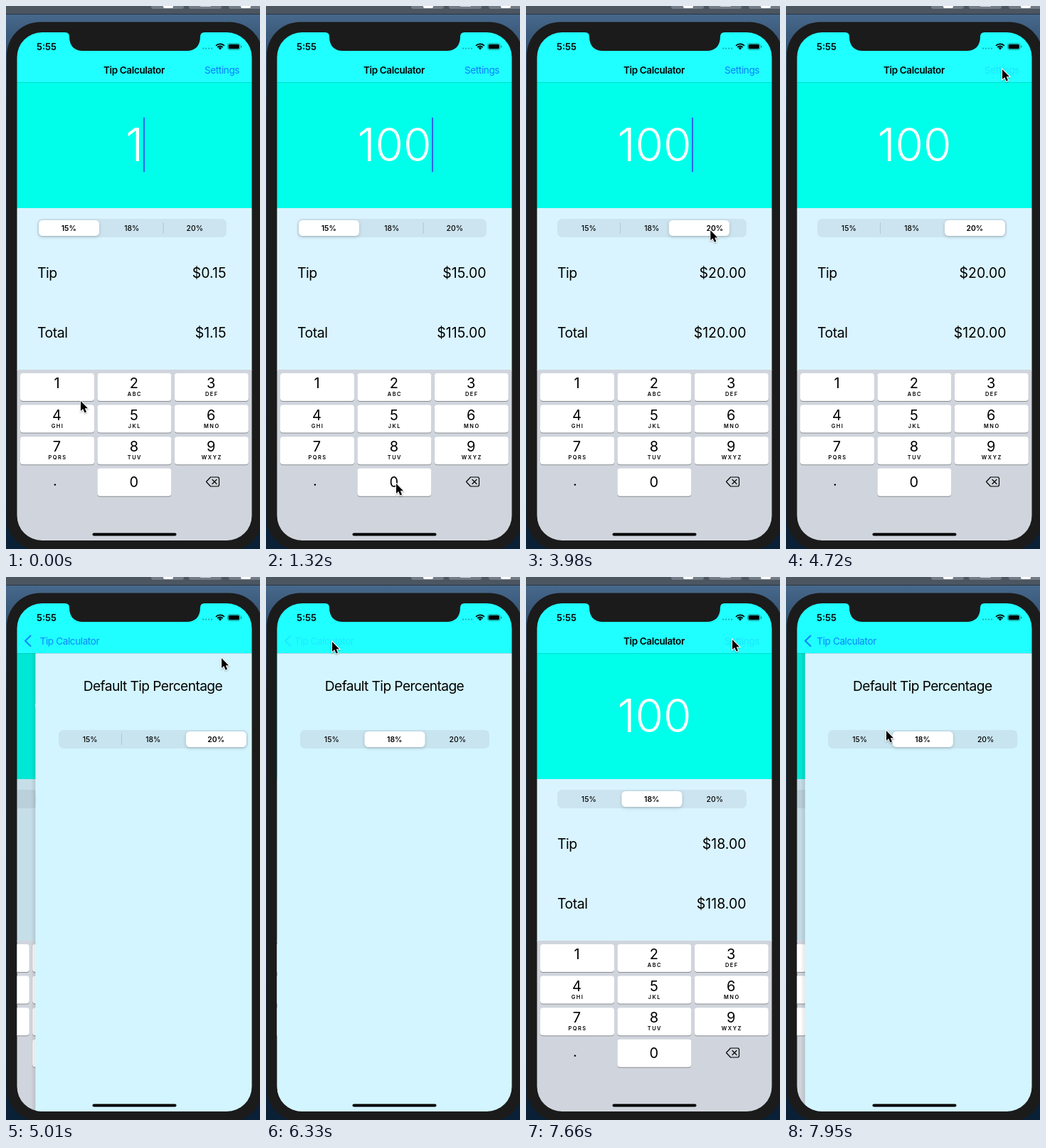
An HTML page with a canvas that plays this animation: 357 px wide and 763 px high, repeating every 8 s.

```html
<!DOCTYPE html>
<html lang="en">
<head>
<meta charset="utf-8">
<title>Tip Calculator</title>
<style>
  html, body { margin: 0; height: 100%; overflow: hidden; background: #1b1b1b; }
  canvas { display: block; }
</style>
</head>
<body>
<canvas id="stage" width="357" height="763"></canvas>
<script>
const ctx = document.getElementById('stage').getContext('2d');
const LOOP = 8000, TICK = 147.2;
const SCREEN = { x: 15.5, y: 37, w: 330, h: 714 };
const BLUE = '#0a7dff', FRAME = '#1b1b1b';
const RATES = [15, 18, 20];

// Pointer stops: tick, x, y
const POINTER = [
  [0, 105, 555], [1, 142, 630], [2, 180, 690], [3, 183, 671], [9, 183, 671],
  [11, 184, 540], [13, 183, 340], [14, 183, 313], [22, 183, 313], [24, 225, 316],
  [25, 262, 316], [28, 258, 315], [30, 296, 130], [31, 306, 82], [32, 304, 89],
  [33, 304, 93], [34, 303, 114], [36, 215, 205], [37, 181, 228], [39, 181, 228],
  [41, 104, 66], [42, 94, 84], [43, 93, 91], [46, 94, 91], [50, 297, 75],
  [52, 290, 88], [54, 141, 216]
];

function box(x, y, w, h, r, fill) {
  ctx.beginPath();
  ctx.roundRect(x, y, w, h, r);
  ctx.fillStyle = fill;
  ctx.fill();
}

function text(str, x, y, size, { weight = 400, color = '#000', align = 'left', gap = 0, alpha = 1 } = {}) {
  ctx.save();
  ctx.globalAlpha *= alpha;
  ctx.font = `${weight} ${size}px Inter, sans-serif`;
  ctx.letterSpacing = gap + 'px';
  ctx.textAlign = align;
  ctx.fillStyle = color;
  ctx.fillText(str, x, y);
  ctx.restore();
}

function line(points, color, width, close = false) {
  ctx.beginPath();
  points.forEach(([x, y]) => ctx.lineTo(x, y));
  if (close) ctx.closePath();
  ctx.strokeStyle = color;
  ctx.lineWidth = width;
  ctx.lineJoin = ctx.lineCap = 'round';
  ctx.stroke();
}

// Thumb position of a segmented control: three quarters of the way on the first tick of a change
const thumbAt = (tick, start, changes) => changes.reduce(
  (pos, [at, to]) => tick < at ? pos : tick === at ? pos + (to - pos) * 0.75 : to, start);

const spring = dt => dt < 0 ? 1 : (1 + 18 * dt) * Math.exp(-18 * dt);

// 0 = calculator, 1 = settings
function pageProgress(s) {
  if (s < 6.4) return 1 - spring(s - 4.772);
  return s < 7.66 ? spring(s - 6.4) : 1 - spring(s - 7.66);
}

function pointerAt(tick) {
  const next = POINTER.findIndex(stop => stop[0] >= tick);
  const [t1, x1, y1] = POINTER[next], [t0, x0, y0] = POINTER[Math.max(0, next - 1)];
  const k = t1 === t0 ? 1 : (tick - t0) / (t1 - t0);
  return [x0 + (x1 - x0) * k, y0 + (y1 - y0) * k];
}

function drawDesktop() {
  const g = ctx.createLinearGradient(0, 11, 0, 763);
  [[0, '#47698c'], [0.07, '#33506e'], [0.2, '#1c2e45'], [1, '#0a2036']].forEach(s => g.addColorStop(...s));
  ctx.fillStyle = g;
  ctx.fillRect(0, 0, 357, 763);
  box(0, 0, 357, 11, 0, '#4b5661');
  box(0, 11, 357, 1, 0, '#2b3641');
  for (const x of [204, 257, 313]) box(x, -6, 46, 10, 3, '#737c86');
  box(221, -3, 14, 6, 2, '#fff');
  box(273, -3, 15, 4, 1, '#ccd1d6');
  box(330, -3, 14, 6, 2, '#fff');
  box(1, 22.5, 360, 743, 47, FRAME);
}

function drawSegments(x, y, thumb) {
  const chosen = Math.round(thumb);
  box(x, y, 266, 26, 7, 'rgba(118,118,128,.13)');
  [1, 2].forEach(n => {
    if (chosen !== n && chosen !== n - 1) box(x + n * 88.5 - 0.3, y + 5, 0.8, 16, 0, 'rgba(60,60,67,.22)');
  });
  ctx.save();
  ctx.shadowColor = 'rgba(0,0,0,.2)';
  ctx.shadowBlur = 4;
  ctx.shadowOffsetY = 1.5;
  box(x + 2 + thumb * 88.5, y + 2, 85, 22, 5.5, '#fff');
  ctx.restore();
  RATES.forEach((rate, n) => text(rate + '%', x + 44.3 + n * 88.5, y + 17, 10.4,
    { weight: n === chosen ? 600 : 500, align: 'center' }));
}

function drawKeyboard() {
  box(15, 511, 331, 241, 0, '#d0d5dd');
  const letters = ['', 'ABC', 'DEF', 'GHI', 'JKL', 'MNO', 'PQRS', 'TUV', 'WXYZ'];
  const key = (col, row, digit, sub) => {
    const x = 20 + col * 108.4, y = 516 + row * 44.6;
    box(x, y + 1, 104, 39, 4, '#898b90');
    box(x, y, 104, 39, 4, '#fff');
    text(digit, x + 51.5, y + (sub === undefined ? 26.5 : 21), 20, { align: 'center' });
    if (sub) text(sub, x + 52.5, y + 32, 7.4, { weight: 600, align: 'center', gap: 1.5 });
  };
  letters.forEach((sub, n) => key(n % 3, Math.floor(n / 3), n + 1, sub));
  key(1, 3, 0);
  text('.', 69, 674, 20, { align: 'center' });
  line([[281.5, 668.5], [287.5, 662], [298, 662], [299.5, 663.5], [299.5, 673.5], [298, 675], [287.5, 675]], '#000', 1.2, true);
  line([[290, 665.5], [296, 671.5]], '#000', 1.2);
  line([[296, 665.5], [290, 671.5]], '#000', 1.2);
}

function drawCalculator(tick, p) {
  const bill = tick < 3 ? 1 : tick < 5 ? 10 : 100;
  const thumb = thumbAt(tick, 0, [[21, 1], [27, 2], [44, 1]]);
  const tip = bill * RATES[Math.round(thumb)] / 100;
  ctx.save();
  ctx.translate(-p * 99, 0);
  box(15, 107, 331, 177, 0, '#00ffea');
  box(15, 284, 331, 228, 0, '#d9f4ff');
  text(bill, 180.5, 218, 64, { weight: 300, color: '#fff', align: 'center' });
  const phase = tick < 9 ? 6 : (tick - 9) % 7;
  const caret = [0.35, 0, 0, 0.6, 1, 1, 1][phase];
  if (p < 0.01) box(173 + 20 * String(bill).length, 156.5, 2, 77, 1, `rgba(45,105,235,${caret})`);
  drawSegments(44, 299, thumb);
  [['Tip', tip, 382], ['Total', bill + tip, 466]].forEach(([label, amount, y]) => {
    text(label, 44, y, 19.5, { gap: -0.5 });
    text('$' + amount.toFixed(2), 309.5, y, 19.5, { align: 'right' });
  });
  box(15, 107, 331, 404, 0, `rgba(0,0,0,${0.1 * p})`);
  drawKeyboard();
  ctx.restore();
}

function drawSettings(tick, p) {
  ctx.save();
  ctx.translate((1 - p) * SCREEN.w, 0);
  const shade = ctx.createLinearGradient(9, 0, 15.5, 0);
  shade.addColorStop(0, 'rgba(0,0,0,0)');
  shade.addColorStop(1, 'rgba(0,0,0,.1)');
  box(9, 107, 6.5, 645, 0, shade);
  box(15.5, 107, 331, 645, 0, '#d3f5ff');
  text('Default Tip Percentage', 180.5, 160, 19.2, { align: 'center', gap: -0.6 });
  drawSegments(48, 215, thumbAt(tick, 2, [[38, 1]]));
  ctx.restore();
}

function drawBars(tick, p) {
  box(15, 37, 331, 70, 0, '#20ffff');
  box(15, 107, 331, 0.6, 0, 'rgba(0,0,0,.25)');
  const x = 40 + 97 * (1 - p), gap = -0.37;
  const back = p * (tick === 43 ? 0.17 : 1);
  text('Tip Calculator', x, 94.5, 13.5, { weight: 600, gap, alpha: Math.max(0, 1 - p * 1.5) });
  text('Tip Calculator', x, 94.5, 13.5, { color: BLUE, gap, alpha: back });
  ctx.globalAlpha = back;
  line([[34.5, 82.5], [27, 89.7], [34.5, 97]], BLUE, 2);
  ctx.globalAlpha = 1;
  const pressed = tick === 32 || tick === 52;
  text('Settings', 279, 94.5, 13.5, { color: BLUE, gap, alpha: pressed ? 0.2 : Math.max(0, 1 - p * 1.5) });

  text('5:55', 43, 61.5, 13, { weight: 600 });
  for (let n = 0; n < 4; n++) box(276 + n * 4, 58.5, 2.2, 2.2, 1, 'rgba(0,70,80,.4)');
  ctx.strokeStyle = '#000';
  ctx.lineCap = 'butt';
  [[1.6, 3.2], [5, 1.9], [8.1, 1.9]].forEach(([r, width]) => {
    ctx.beginPath();
    ctx.arc(301, 61.5, r, -Math.PI * 0.76, -Math.PI * 0.24);
    ctx.lineWidth = width;
    ctx.stroke();
  });
  ctx.beginPath();
  ctx.roundRect(311.5, 52.5, 17.5, 9, 2.5);
  ctx.strokeStyle = 'rgba(0,0,0,.4)';
  ctx.lineWidth = 0.8;
  ctx.stroke();
  box(312.7, 53.7, 15.1, 6.6, 1.5, '#000');
  box(330, 55.5, 1.2, 3, 0.6, 'rgba(0,0,0,.45)');
}

function drawNotch() {
  ctx.fillStyle = FRAME;
  ctx.fill(new Path2D('M83 36H279V37Q273 37 273 43C273 56 266 63 254 63H108C96 63 89 56 89 43Q89 37 83 37Z'));
}

function drawPointer(x, y) {
  ctx.save();
  ctx.translate(x, y);
  ctx.shadowColor = 'rgba(0,0,0,.3)';
  ctx.shadowBlur = 2;
  ctx.shadowOffsetY = 1;
  const arrow = new Path2D('M0 0V14L3.2 11.1L5.6 16.4L8 15.4L5.8 10.2H10Z');
  ctx.strokeStyle = '#fff';
  ctx.lineWidth = 2;
  ctx.lineJoin = 'miter';
  ctx.stroke(arrow);
  ctx.shadowColor = 'transparent';
  ctx.fillStyle = '#000';
  ctx.fill(arrow);
  ctx.restore();
}

function draw(now) {
  const tick = Math.floor((now % LOOP + 3) / TICK);
  const p = pageProgress(tick * TICK / 1000);
  drawDesktop();
  ctx.save();
  ctx.beginPath();
  ctx.roundRect(SCREEN.x, SCREEN.y, SCREEN.w, SCREEN.h, 35);
  ctx.clip();
  drawCalculator(tick, p);
  if (p > 0.001) drawSettings(tick, p);
  drawBars(tick, p);
  ctx.restore();
  drawNotch();
  box(121.5, 740.5, 118, 4, 2, '#000');
  drawPointer(...pointerAt(tick));
  requestAnimationFrame(draw);
}
requestAnimationFrame(draw);
</script>
</body>
</html>
```
